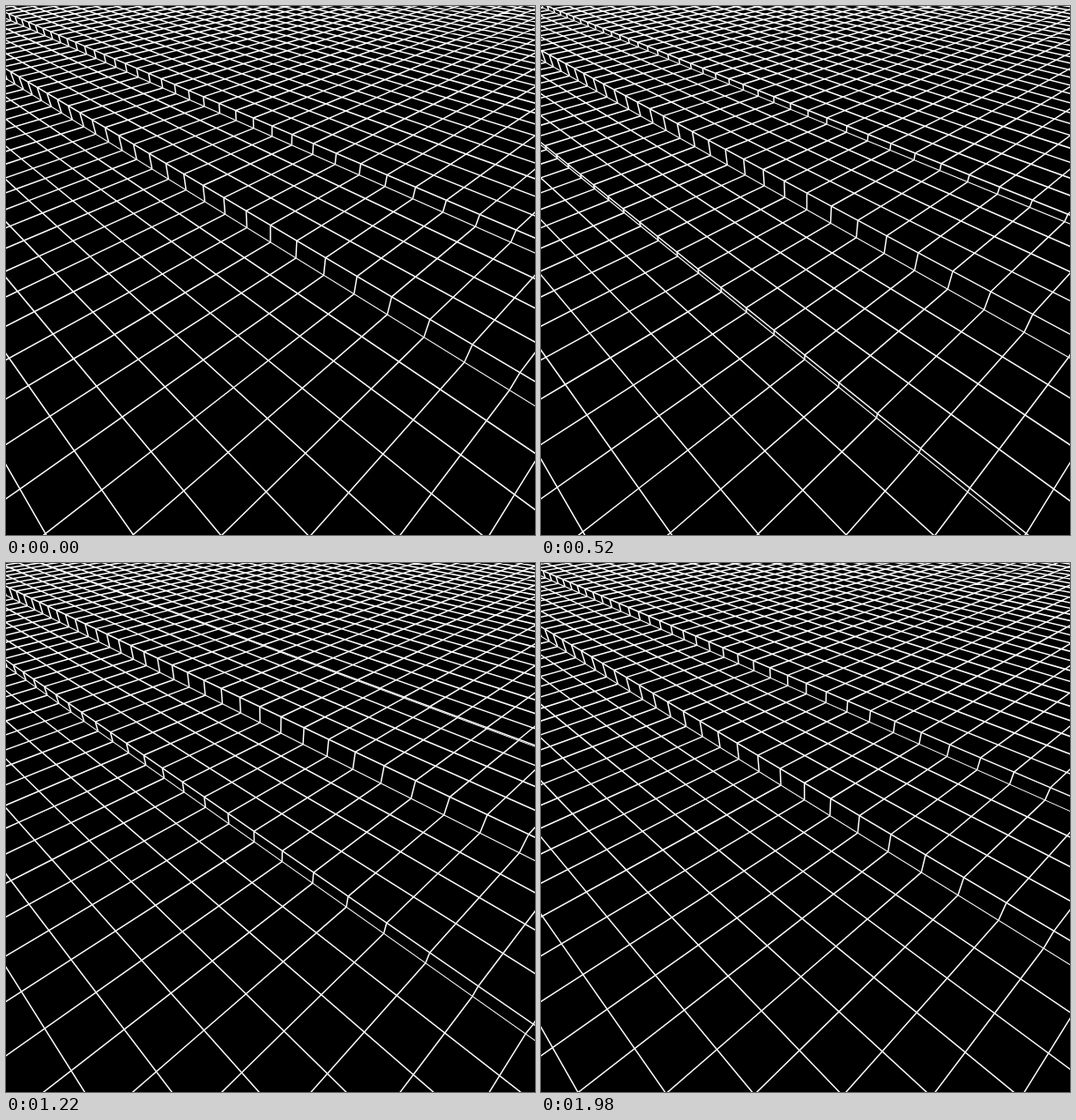
Recreate the animation shown at these times as an HTML page with a canvas. Size 600x600 px, loop 2000 ms.

```html
<!DOCTYPE html>
<html>
<head>
<meta charset="utf-8">
<style>
html, body { margin: 0; width: 100%; height: 100%; overflow: hidden; background: #000; }
canvas { display: block; width: 600px; height: 600px; }
</style>
</head>
<body>
<canvas id="stage" width="600" height="600"></canvas>
<script>
const ctx = document.getElementById('stage').getContext('2d');
const LOOP = 2000, STEP = 4;
const V_MIN = -44, V_MAX = 8, U_MIN = -2, U_MAX = 46;

// Vanishing heights of the floor and of the vertical risers
const HORIZON = -158, NADIR = 890;
// Depth and sideways position: at the origin, per u, per v
const DEPTH = [0.001322, 0.0000927, -0.0000948];
const SIDE = [0.0592, 0.09443, 0.03682];

// Escalator climb: start, length and total rise
const START = 4, CLIMB = 6.7, RISE = 0.000118;

const mix = (k, u, v) => k[0] + k[1] * u + k[2] * v;

function project(u, v, h) {
  const w = mix(DEPTH, u, v);
  const d = w - h;
  return [
    (mix(SIDE, u, v) - 300 * h) / d,
    (HORIZON * w + 1 - NADIR * h) / d
  ];
}

function level(u) {
  return RISE * Math.min(1, Math.max(0, (u - START) / CLIMB));
}

function line(a, b) {
  ctx.moveTo(a[0], a[1]);
  ctx.lineTo(b[0], b[1]);
}

function stroke(width, path) {
  ctx.lineWidth = width;
  ctx.beginPath();
  path();
  ctx.stroke();
}

function row(u, h) {
  if (u >= U_MIN) line(project(u, V_MIN, h), project(u, V_MAX, h));
}

function drawPlate(u0) {
  const h = level(u0), below = level(u0 - STEP);
  const from = Math.max(u0, U_MIN), to = u0 + STEP;
  const isStep = h - below > 1e-7;

  stroke(1.5, () => {
    for (let i = 0; i < STEP; i++) row(u0 + i, h);
    for (let v = V_MIN; v <= V_MAX; v++) {
      if (to > from) line(project(from, v, h), project(to, v, h));
      if (isStep) line(project(u0, v, below), project(u0, v, h));
    }
  });
  if (isStep) stroke(1.1, () => row(u0, below));
}

function draw(t) {
  ctx.fillStyle = '#000';
  ctx.fillRect(0, 0, 600, 600);
  ctx.strokeStyle = '#fff';
  const shift = STEP * t / LOOP;
  for (let u = -2 * STEP; u < U_MAX; u += STEP) drawPlate(u + shift);
}

function tick() {
  const t = performance.now() % LOOP;
  draw(Math.floor(t / 20) * 20);
  requestAnimationFrame(tick);
}
tick();
</script>
</body>
</html>
```
